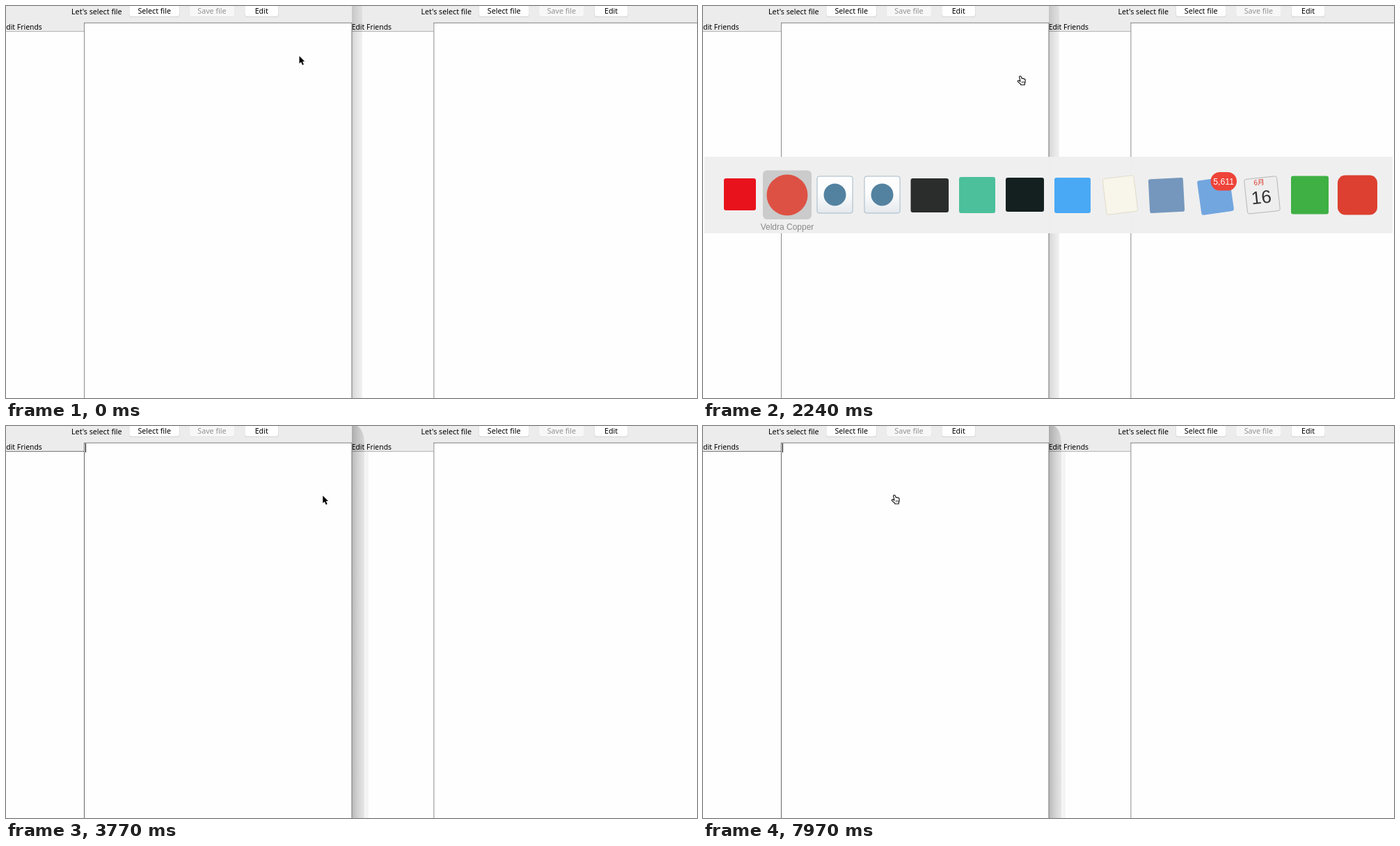
Write an HTML page that moves like this. It is 993 by 564 pixels and loops after 8 s.

```html
<!DOCTYPE html>
<html lang="en">
<head>
<meta charset="utf-8">
<title>Two editor windows</title>
<style>
  html, body { margin: 0; width: 100%; height: 100%; overflow: hidden; background: #fefefe; }
  svg { display: block; width: 993px; height: 564px; }
  .ui { font: 10.7px "Noto Sans", "Open Sans", sans-serif; }
  .small { font-size: 10.4px; }
  .mid { text-anchor: middle; }
  .dock { font-family: "Liberation Sans", Arial, sans-serif; }
  .cjk { font-family: "Noto Sans CJK JP", "Noto Sans CJK", sans-serif; }
</style>
</head>
<body>
<svg viewBox="0 0 993 564" xmlns="http://www.w3.org/2000/svg">
  <defs>
    <linearGradient id="soft" gradientUnits="userSpaceOnUse" x1="497" x2="512" y1="0" y2="0">
      <stop offset="0" stop-opacity=".16"/>
      <stop offset=".5" stop-opacity=".1"/>
      <stop offset="1" stop-opacity=".05"/>
    </linearGradient>
    <linearGradient id="deep" gradientUnits="userSpaceOnUse" x1="497" x2="515" y1="0" y2="0">
      <stop offset="0" stop-opacity=".27"/>
      <stop offset=".5" stop-opacity=".17"/>
      <stop offset="1" stop-opacity=".09"/>
    </linearGradient>
    <linearGradient id="paper" x2="0" y2="1">
      <stop offset=".45" stop-color="#fdfdfd"/>
      <stop offset="1" stop-color="#e4e9ed"/>
    </linearGradient>
  </defs>

  <rect width="993" height="564" fill="#fefefe"/>
  <g id="right"></g>
  <rect id="softShadow" x="497" width="15" height="564" fill="url(#soft)"/>
  <path id="deepShadow" d="M497 0H505Q514 5 515 24V564H497Z" fill="url(#deep)"/>
  <rect id="wideShadow" x="515" y="37" width="6" height="527" fill-opacity=".04"/>
  <g id="left"></g>
  <g class="ui small">
    <text x="-5.5" y="34">Edit Friends</text>
    <text x="496.7" y="34">Edit Friends</text>
  </g>
  <path d="M497 24V564" stroke="#858585" stroke-width="1.2"/>
  <g id="focus" fill="none">
    <path d="M0 36.5H112.5" stroke="#777"/>
    <path d="M112.5 24V564" stroke="#666"/>
  </g>
  <rect id="caret" x="114" y="25" width="1" height="13"/>

  <g id="switcher">
    <rect id="panel" x="2" y="217" width="989" height="110"/>
    <g id="dock" class="dock">
      <rect id="highlight" y="236.5" width="70" height="70.5" rx="6"/>
      <g id="icons"></g>
      <text id="label" class="mid" y="321.5" font-size="12" fill="#8a8a8a"></text>
    </g>
  </g>

  <path id="arrow" d="M.5 .5V11.2L3 9 5 13.4 6.9 12.5 5 8.3H8.2Z" stroke="#fff" stroke-width=".8" paint-order="stroke"/>
  <path id="beam" d="M.5 .7Q3 .7 3.5 2Q4 .7 6.5 .7M3.5 2V11.5M.5 12.5Q3 12.5 3.5 11.3Q4 12.5 6.5 12.5M2 8.5H5" fill="none" stroke="#222" stroke-width="1.1"/>
  <g id="hand">
    <path d="M4 1.1Q5 .3 6 1.4L7.2 4.4Q8.3 3.7 9 4.6Q10 4.1 10.6 5.1Q11.9 4.9 12.1 6.3L12.2 9.2Q12 10.6 11.2 11.6V13.5H5.7V12.6L1.4 8.8Q.8 7.6 2 7.2Q3 7 4.4 8.3L5 8.2L3.6 2.5Q3.4 1.6 4 1.1Z" fill="#fff" stroke="#111" stroke-width="1.1"/>
    <path d="M7.2 8.4V11M8.8 8.2V11M10.4 8V11" stroke="#222" stroke-width=".7"/>
  </g>
</svg>

<script>
const $ = id => document.getElementById(id);
const show = (id, on) => $(id).setAttribute('display', on ? 'inline' : 'none');

function button(x, width, label, enabled = true) {
  return `<rect x="${x}" y="-5" width="${width}" height="21" rx="4" fill="#000" opacity="${enabled ? .17 : .06}"/>
    <rect x="${x + .3}" y="-5" width="${width - .6}" height="20.2" rx="3.7" fill="${enabled ? '#fff' : '#f7f7f7'}"/>
    <text class="mid" x="${x + width / 2}" y="11" fill="${enabled ? '#000' : '#929292'}">${label}</text>`;
}

function windowFrame(from, left, right) {
  return `<rect x="${from}" width="${right - from}" height="24" fill="#ececec"/>
    <rect x="${from}" y="24" width="${left - from}" height="12" fill="#ececec"/>
    <path d="M${from} 36.5H${left}" stroke="#b4b4b4"/>
    <path d="M${left + .5} 564V24" stroke="#8c8c8c"/>
    <path d="M${left} 24.3H${right}" stroke="#808080"/>`;
}

function controls(dx) {
  return `<g class="ui" transform="translate(${dx})">
    <text x="94" y="12">Let's select file</text>
    ${button(177, 72.5, 'Select file')}${button(263.5, 65, 'Save file', false)}${button(343, 48.5, 'Edit')}</g>`;
}

$('left').innerHTML = windowFrame(0, 112, 497) + controls(0);
$('right').innerHTML = windowFrame(497, 614.4, 993) + controls(502.4);

const tile = (x, y, w, h, fill, extra = '') =>
  `<rect x="${x}" y="${y}" width="${w}" height="${h}" rx="3" fill="${fill}" ${extra}/>`;
const sheet = x => tile(x, 245, 51, 53, 'url(#paper)', 'stroke="#a3b8c8"') +
  `<circle cx="${x + 25.5}" cy="271.5" r="16" fill="#5382a1"/>`;

$('icons').innerHTML = [
  tile(30, 248, 46, 46, '#e8121c'),
  '<circle cx="121" cy="272" r="29.5" fill="#dd5144"/>',
  sheet(164), sheet(232),
  tile(298.5, 248, 54.5, 49, '#2b2d2d'),
  tile(368, 246, 52, 52, '#4cbf9b'),
  tile(435, 247, 55, 49, '#142020'),
  tile(505, 247, 52, 51, '#4aa9f5'),
  tile(577, 246, 45, 52, '#f8f5ea', 'stroke="#d9d2bd" stroke-width=".7" transform="rotate(-7 599 272)"'),
  tile(641, 248, 50, 49, '#7597bd', 'transform="rotate(-3 666 272)"'),
  tile(713, 248, 47, 50, '#72a6df', 'transform="rotate(-8 737 273)"'),
  '<rect x="729.5" y="239" width="37.5" height="26.5" rx="13.2" fill="#ee4338"/>',
  '<text class="mid" x="748.2" y="257" font-size="12.3" fill="#fff">5,611</text>',
  '<g transform="rotate(-6 803 272)">',
  tile(780, 247, 47, 50, '#eeeeee', 'stroke="#aaa" stroke-width=".8"'),
  '<text class="mid cjk" x="801" y="257" font-size="10" fill="#d8362c">6月</text>',
  '<text class="mid" x="802" y="284" font-size="26" fill="#333">16</text></g>',
  tile(845, 244.5, 54, 55, '#3fb044'),
  tile(912, 243.5, 57, 57, '#dd4030', 'style="rx:11px"')
].join('');

const LOOP = 8000;
// start time, cursor, x, y
const cursorSteps = [
  [0, 'arrow', 421, 71.5], [210, 'arrow', 454.5, 87], [570, 'arrow', 454.8, 99.8],
  [2070, 'hand', 451, 100], [3770, 'arrow', 454.8, 99.8], [4170, 'beam', 452, 94],
  [5910, 'beam', 371, 94], [6080, 'beam', 271, 93], [7970, 'hand', 270, 98.5]
];
const caretToggles = [3770, 4170, 4650, 5130, 5760, 6230, 6710, 7190, 7670];

function render(t) {
  const [, kind, x, y] = cursorSteps.findLast(step => step[0] <= t);
  for (const id of ['arrow', 'beam', 'hand']) show(id, id === kind);
  $(kind).setAttribute('transform', `translate(${x} ${y})`);

  const fading = t >= 3530, active = t >= 3770;
  show('softShadow', !fading);
  show('deepShadow', fading);
  show('wideShadow', active);
  show('focus', active);
  show('caret', caretToggles.filter(at => at <= t).length % 2 === 1);

  show('switcher', t >= 2240 && !active);
  $('panel').setAttribute('fill', fading ? '#fff' : '#efefef');
  $('panel').setAttribute('fill-opacity', fading ? .8 : .985);
  $('dock').setAttribute('opacity', fading ? .93 : 1);
  $('highlight').setAttribute('fill', fading ? '#d2d2d2' : '#cbcbcb');
  const second = t >= 3140;
  $('highlight').setAttribute('x', second ? 154 : 86);
  $('label').setAttribute('x', second ? 189 : 121);
  $('label').textContent = second ? 'java' : 'Veldra Copper';
}

const start = performance.now();
function tick() {
  render((performance.now() - start) % LOOP);
  requestAnimationFrame(tick);
}
tick();
</script>
</body>
</html>
```
